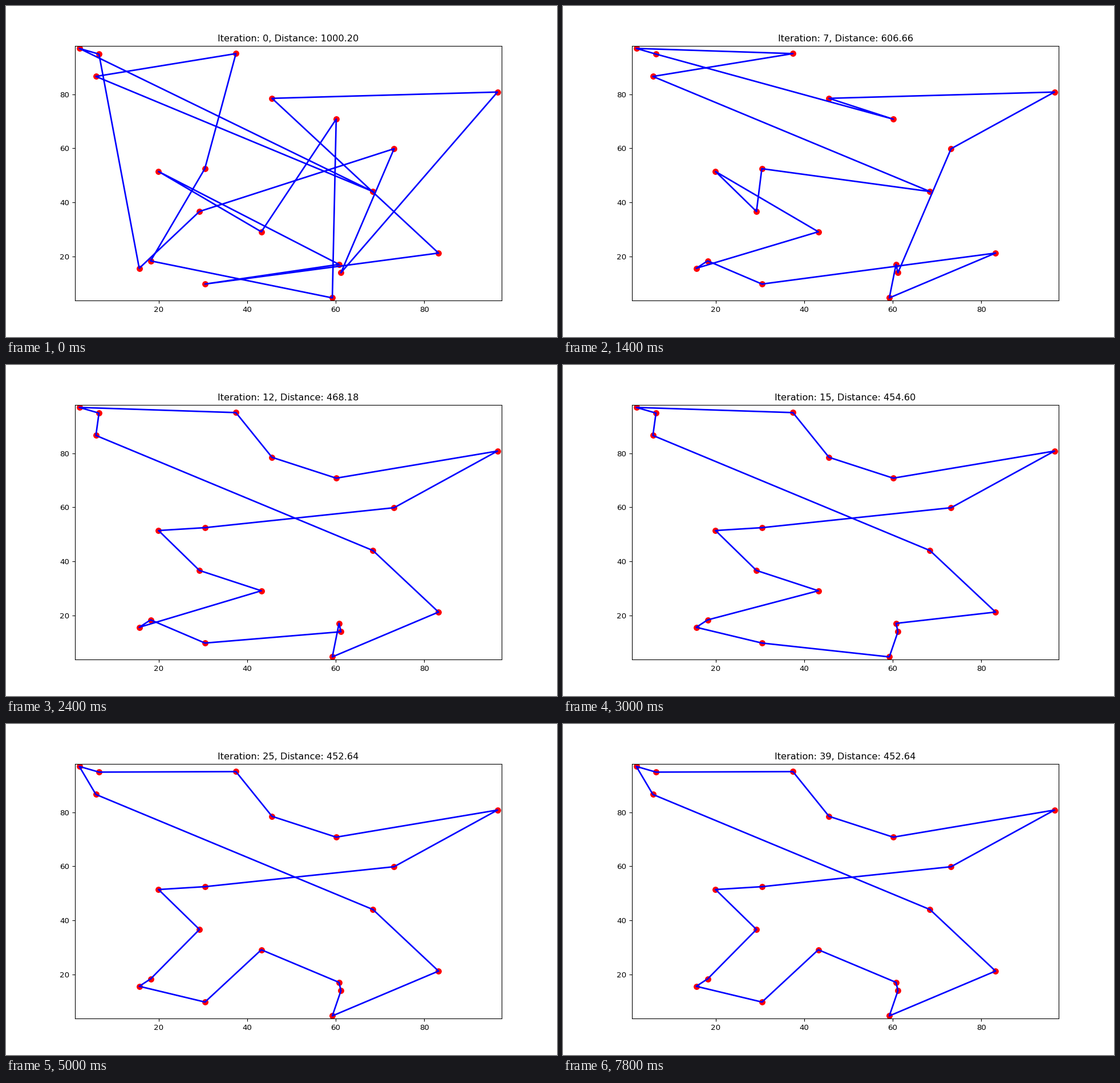
Recreate the animation shown at these times as a matplotlib script. Size 966x580 px, loop 8000 ms.

```python
from itertools import combinations

import matplotlib.pyplot as plt
import numpy as np
from matplotlib.animation import FuncAnimation

STEPS = 40
INTERVAL = 200
TENURE = 10
SCALE = 0.966  # a 10 x 6 inch layout shrunk to 966 x 580 pixels

np.random.seed(42)
cities = np.random.rand(20, 2) * 100
start = [19, 5, 16, 2, 11, 1, 10, 17, 12, 6,
         18, 15, 13, 9, 4, 14, 7, 8, 0, 3]


def closed_path(route):
    return cities[route + route[:1]]


def length(route):
    return np.hypot(*np.diff(closed_path(route), axis=0).T).sum()


def neighbours(route):
    """All 2-opt reversals that keep the first and last city in place."""
    for i, j in combinations(range(1, len(route)), 2):
        if j - i > 1:
            yield route[:i] + route[i:j][::-1] + route[j:]


def tabu_search(route):
    """Best route known after each iteration."""
    visited, best, history = [route], route, [route]
    for _ in range(STEPS - 1):
        recent = visited[-TENURE:]
        route = min((r for r in neighbours(route) if r not in recent),
                    key=length)
        visited.append(route)
        best = min(best, route, key=length)
        history.append(best)
    return history


routes = tabu_search(start)

plt.rcParams.update({
    "font.family": "DejaVu Sans",
    "font.size": 10 * SCALE,
    "axes.titlepad": 6 * SCALE,
})
fig, ax = plt.subplots(figsize=(9.66, 5.8), dpi=100)
ax.scatter(cities[:, 0], cities[:, 1], c="red", s=50 * SCALE ** 2)
line, = ax.plot([], [], "b-", lw=2 * SCALE)
(x0, y0), (x1, y1) = cities.min(axis=0), cities.max(axis=0)
ax.set_xlim(x0 - 1, x1 + 1)
ax.set_ylim(y0 - 1, y1 + 1)
title = ax.set_title("")


def update(step):
    route = routes[step]
    line.set_data(*closed_path(route).T)
    title.set_text(f"Iteration: {step}, Distance: {length(route):.2f}")
    return line, title


anim = FuncAnimation(fig, update, frames=STEPS, interval=INTERVAL,
                     repeat=True, repeat_delay=0, blit=False)
plt.show()
```
